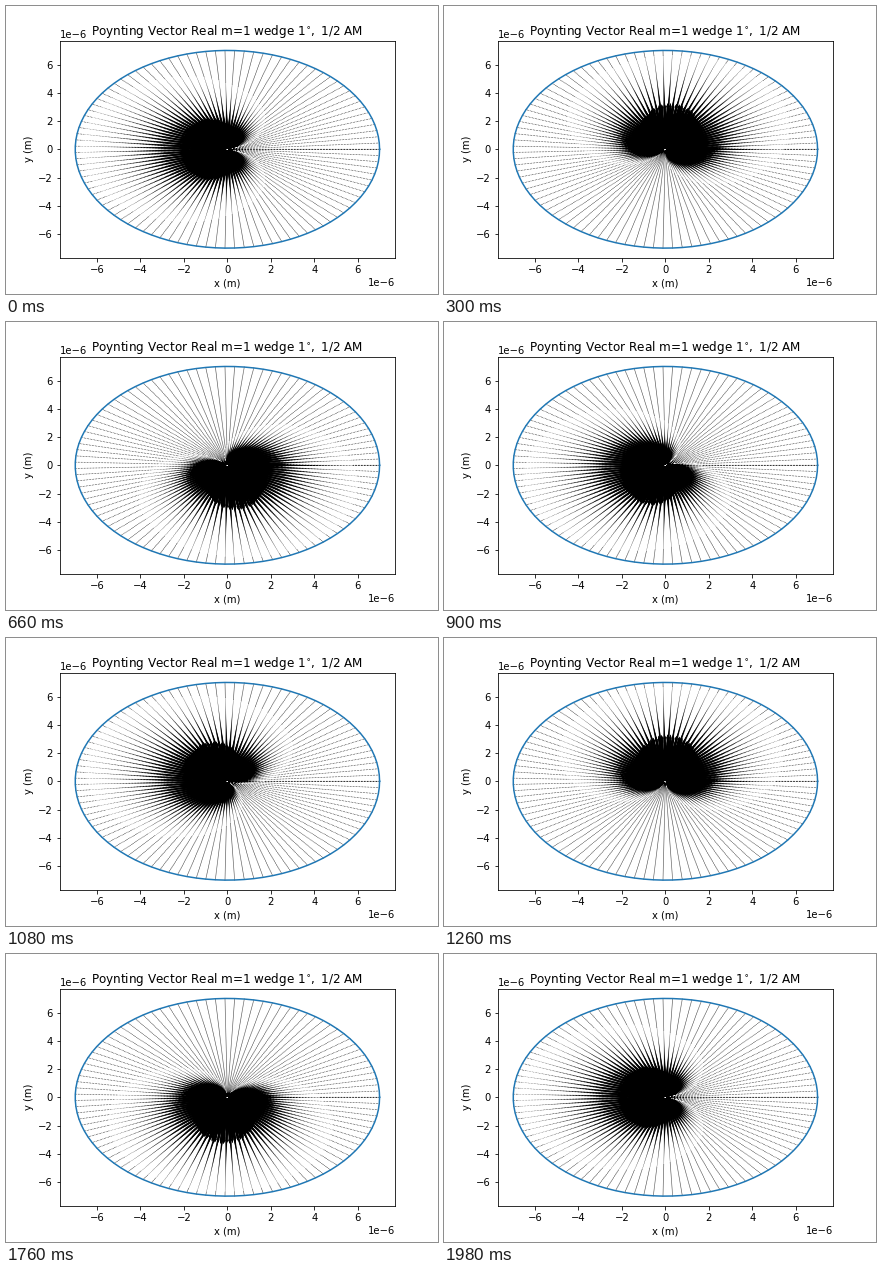
Recreate the animation shown at these times as a matplotlib script. Size 432 by 288 pixels, loop 2 s.

```python
import numpy as np
import matplotlib.pyplot as plt
from matplotlib.animation import FuncAnimation
from matplotlib.collections import PathCollection
from matplotlib.path import Path
from matplotlib.transforms import IdentityTransform

FRAMES, INTERVAL = 100, 20
RADIUS = 7e-6
N_R, N_PHI = 100, 100
HEAD_W, HEAD_LEN, HEAD_AXIS = 3, 5, 4.5   # in shaft widths

fig = plt.figure(figsize=(6, 4), dpi=72, facecolor="white")
fig.subplots_adjust(left=0.125, right=0.9, bottom=0.125, top=0.88)
ax = fig.add_subplot()

phi = np.linspace(0, 2 * np.pi, N_PHI)
r = np.linspace(RADIUS / N_R, RADIUS, N_R)[:, None]

ax.plot(RADIUS * np.cos(phi), RADIUS * np.sin(phi))
ax.set_xlim(-1.1 * RADIUS, 1.1 * RADIUS)
ax.set_ylim(-1.1 * RADIUS, 1.1 * RADIUS)
ax.set_xlabel("x (m)")
ax.set_ylabel("y (m)")
ax.set_title(r"Poynting Vector Real m=1 wedge $1^{\circ},$ 1/2 AM", y=1.0)

# Arrow tails in pixels, and the shaft width for a dense field
xy = np.stack([r * np.cos(phi), r * np.sin(phi)], axis=-1)
tails = ax.transData.transform(xy.reshape(-1, 2)).reshape(N_R, N_PHI, 1, 2)
width = 0.06 * ax.bbox.width / 25

hexagon = np.arange(7) * np.pi / 3
half = 0.5 * np.array([1, 1, HEAD_W, 0, -HEAD_W, -1, -1])
codes = np.tile([Path.MOVETO] + [Path.LINETO] * 6 + [Path.CLOSEPOLY], N_PHI)
cos, sin = np.cos(phi)[:, None], np.sin(phi)[:, None]


def arrow_shapes(length):
    """Outlines along +x; short arrows shrink, tiny ones become dots."""
    size = np.minimum(length / HEAD_LEN, 1)[..., None]
    full = np.maximum(length, HEAD_LEN)
    neck, barb = full - HEAD_AXIS, full - HEAD_LEN
    zero = np.zeros_like(full)
    x = np.stack([zero, neck, barb, full, barb, neck, zero], axis=-1) * size
    y = half * size
    tiny = (length < 1)[..., None]
    x = np.where(tiny, 0.5 * np.cos(hexagon), x)
    y = np.where(tiny, 0.5 * np.sin(hexagon), y)
    return x, y


def rings(k):
    turn = 4 * np.pi * k / (FRAMES - 1)
    lobe = (1 - np.cos(phi + turn)) / 2
    length = 37 * lobe / ((r * 1e6) ** 2 + 0.8)
    x, y = arrow_shapes(length / width)
    pts = tails + width * np.stack([x * cos - y * sin, x * sin + y * cos], -1)
    pts = np.concatenate([pts, pts[:, :, :1]], axis=2)
    return [Path(ring.reshape(-1, 2), codes) for ring in pts]


field = PathCollection(rings(0), facecolors="black", edgecolors="none",
                       linewidths=0, transform=IdentityTransform())
ax.add_collection(field, autolim=False)


def update(k):
    field.set_paths(rings(k))
    return [field]


anim = FuncAnimation(fig, update, frames=FRAMES, interval=INTERVAL,
                     repeat=True, repeat_delay=0)
plt.show()
```
